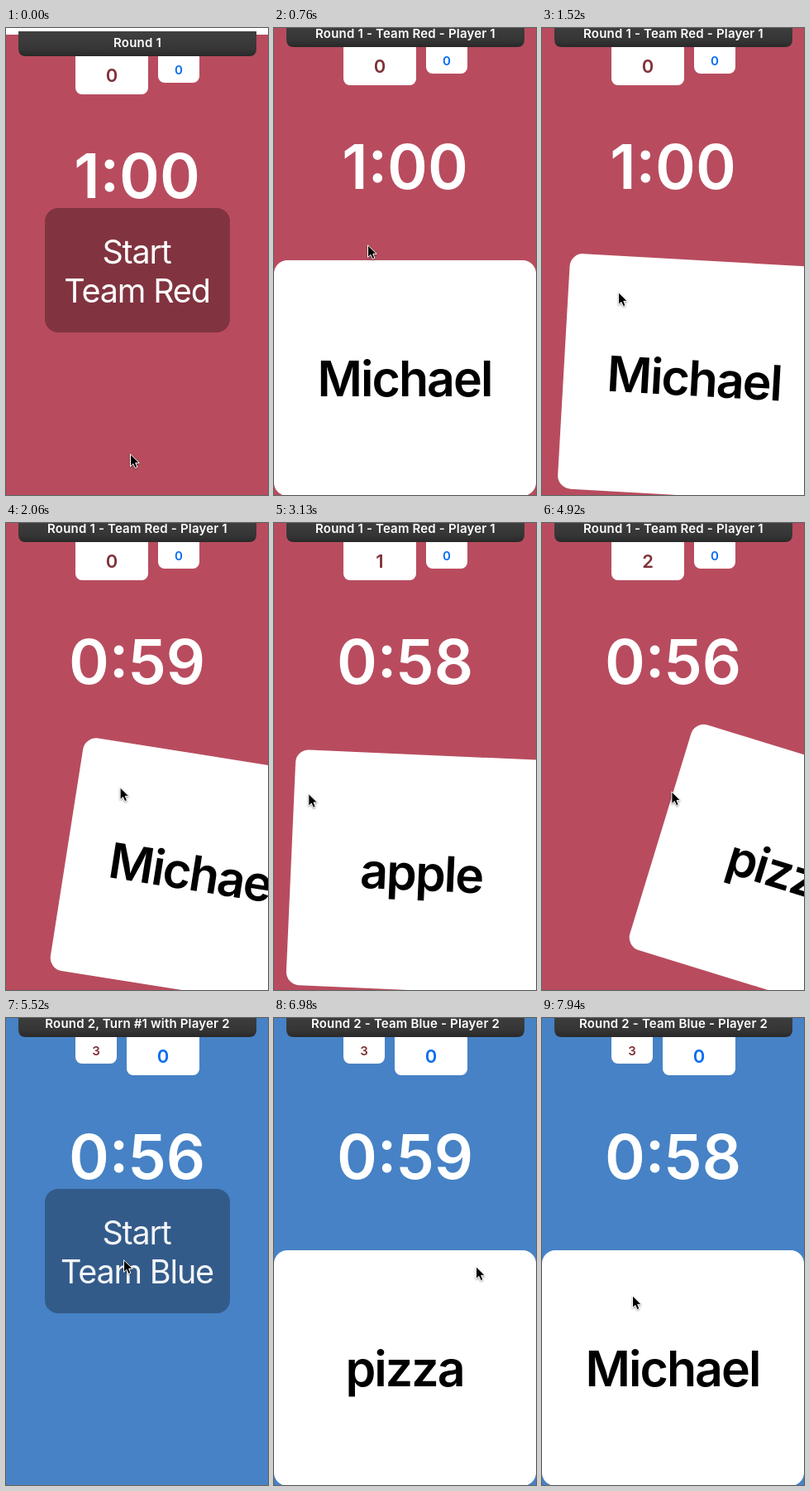
Recreate the animation shown at these times as an HTML page. Size 317x563 px, loop 7.99 s.

```html
<!DOCTYPE html>
<html lang="en">
<head>
<meta charset="utf-8">
<title>Word game</title>
<style>
  html, body { margin: 0; width: 100%; height: 100%; overflow: hidden; background: #fff; }
  svg { display: block; width: 100%; height: 100%; }
  text { font-family: Inter, "Liberation Sans", sans-serif; text-anchor: middle; font-weight: 600; }
  #title { font-size: 15px; letter-spacing: .012em; fill: #fff; }
  #clock { font-size: 74px; font-weight: 570; fill: #fff; }
  #label { font-size: 39.5px; letter-spacing: -.03em; fill: #fff; }
  #label text { font-weight: 400; }
  #word { font-size: 59px; font-weight: 580; letter-spacing: -.033em; }
</style>
</head>
<body>
<svg viewBox="0 0 317 563">
  <defs>
    <linearGradient id="dark" x2="0" y2="1">
      <stop stop-color="#404040"/>
      <stop offset=".7" stop-color="#363636"/>
      <stop offset="1" stop-color="#292929"/>
    </linearGradient>
  </defs>
  <g id="page">
    <rect id="back" y="-3" width="317" height="580"/>
    <rect id="redBox" x="84" y="-20" rx="8" fill="#fff"/>
    <rect id="blueBox" y="-20" rx="8" fill="#fff"/>
    <text id="redScore" fill="#7f3238"></text>
    <text id="blueScore" fill="#0a6df0"></text>
    <path d="M15-7H303V14Q303 23 294 23H24Q15 23 15 14Z" fill="url(#dark)"/>
    <text id="title" x="159" y="11.5"></text>
    <text id="clock" x="158.5" y="194"></text>
    <g id="button">
      <rect id="pad" x="47" y="206" width="224" height="150" rx="16"/>
      <g id="label">
        <text x="158" y="273">Start</text>
        <text id="team" x="158.5" y="320"></text>
      </g>
    </g>
    <g id="card">
      <rect y="280" width="317" height="284" rx="16" fill="#fff"/>
      <text id="word" x="158" y="443.5"></text>
    </g>
  </g>
  <path id="cursor" d="M.5 .8V15.6L3.9 12.4 6.2 17.6 8.9 16.5 6.7 11.3H11.2Z"
    stroke="#fff" style="filter:drop-shadow(0 1px 1px #0006)"/>
</svg>
<script>
const LOOP = 7990, START_RED = 760, END_RED = 5100, START_BLUE = 5920;
const THROW = 160; // time a released card takes to leave
const el = id => document.getElementById(id);
const set = (id, attrs) => { for (const k in attrs) el(id).setAttribute(k, attrs[k]); };
const write = (id, s) => { if (el(id).textContent !== s) el(id).textContent = s; };
const clamp = v => Math.max(0, Math.min(1, v));

// pointer moves: start, end, x, y reached
const home = [150, 513];
const moves = [
  [60, 540, 113, 261], [820, 1050, 66, 318],
  [1230, 1340, 92, 318], [1520, 2410, 167, 318],
  [2650, 2890, 21, 326], [3070, 3550, 181, 323],
  [3850, 4330, 20, 324], [4510, 4950, 166, 323],
  [5340, 5520, 142, 291], [5560, 5740, 140, 278],
  [6210, 6320, 244, 299], [7280, 7680, 109, 334]
];

const swipes = [
  { grab: 1230, drop: 2130, word: 'Michael' },
  { grab: 3070, drop: 3460, word: 'apple' },
  { grab: 4510, drop: END_RED - THROW, word: 'pizza' },
  { grab: 7280, drop: 7620, word: 'pizza' },
  { grab: LOOP, drop: LOOP, word: 'Michael' }
];

function pointer(t) {
  let [x, y] = home;
  for (const [from, to, toX, toY] of moves) {
    const k = clamp((t - from) / (to - from));
    x += (toX - x) * k;
    y += (toY - y) * k;
  }
  return [x, y];
}

function scoreBox(name, x, big, points) {
  const w = big ? 88 : 50;
  set(name + 'Box', { x, width: w, height: big ? 89 : 75 });
  set(name + 'Score', { x: x + w / 2, y: big ? 54 : 44.5, 'font-size': big ? 22 : 15 });
  write(name + 'Score', String(points));
}

// The card follows the pointer, tilting with its offset, then flies on.
function drawCard(t) {
  const { grab, drop, word } = swipes.find(s => t < s.drop + THROW);
  const [x0, y0] = pointer(grab);
  const [x, y] = pointer(Math.max(grab, Math.min(t, drop)));
  const dx = x - x0 + Math.sign(x - x0) * 420 * clamp((t - drop) / THROW);
  set('card', { transform: `translate(${dx} ${y - y0}) rotate(${dx / 8} 158.5 422)` });
  write('word', word);
}

function draw(t) {
  const blue = t >= END_RED;
  const playing = blue ? t >= START_BLUE : t >= START_RED;
  const [x, y] = pointer(t);

  set('page', { transform: `translate(0 ${11 * (1 - clamp((t - 60) / 280))})` });
  set('back', { fill: blue ? '#4682c5' : '#b84c5e' });
  set('pad', { fill: blue ? '#335b8a' : '#813440' });

  const points = swipes.filter(s => s.drop <= Math.min(t, END_RED)).length;
  scoreBox('red', 84, !blue, points);
  scoreBox('blue', blue ? 146 : 184, blue, 0);

  const team = blue ? 'Team Blue' : 'Team Red';
  const n = blue ? 2 : 1;
  write('title', playing ? `Round ${n} - ${team} - Player ${n}`
    : blue ? 'Round 2, Turn #1 with Player 2' : 'Round 1');
  write('team', team);

  const since = t >= START_BLUE ? t - 5940 : Math.min(t, END_RED) - 660;
  const gone = Math.max(0, Math.floor(since / 1000));
  write('clock', gone ? '0:' + (60 - gone) : '1:00');

  const hover = x > 47 && x < 271 && y > 206 && y < 356;
  set('label', { opacity: hover ? .94 : 1 });
  set('button', { visibility: playing ? 'hidden' : 'visible' });
  set('card', { visibility: playing ? 'visible' : 'hidden' });
  if (playing) drawCard(t);
  set('cursor', { transform: `translate(${x} ${y})` });
}

const begin = performance.now();
function tick() {
  draw((performance.now() - begin) % LOOP);
  requestAnimationFrame(tick);
}
tick();
</script>
</body>
</html>
```
